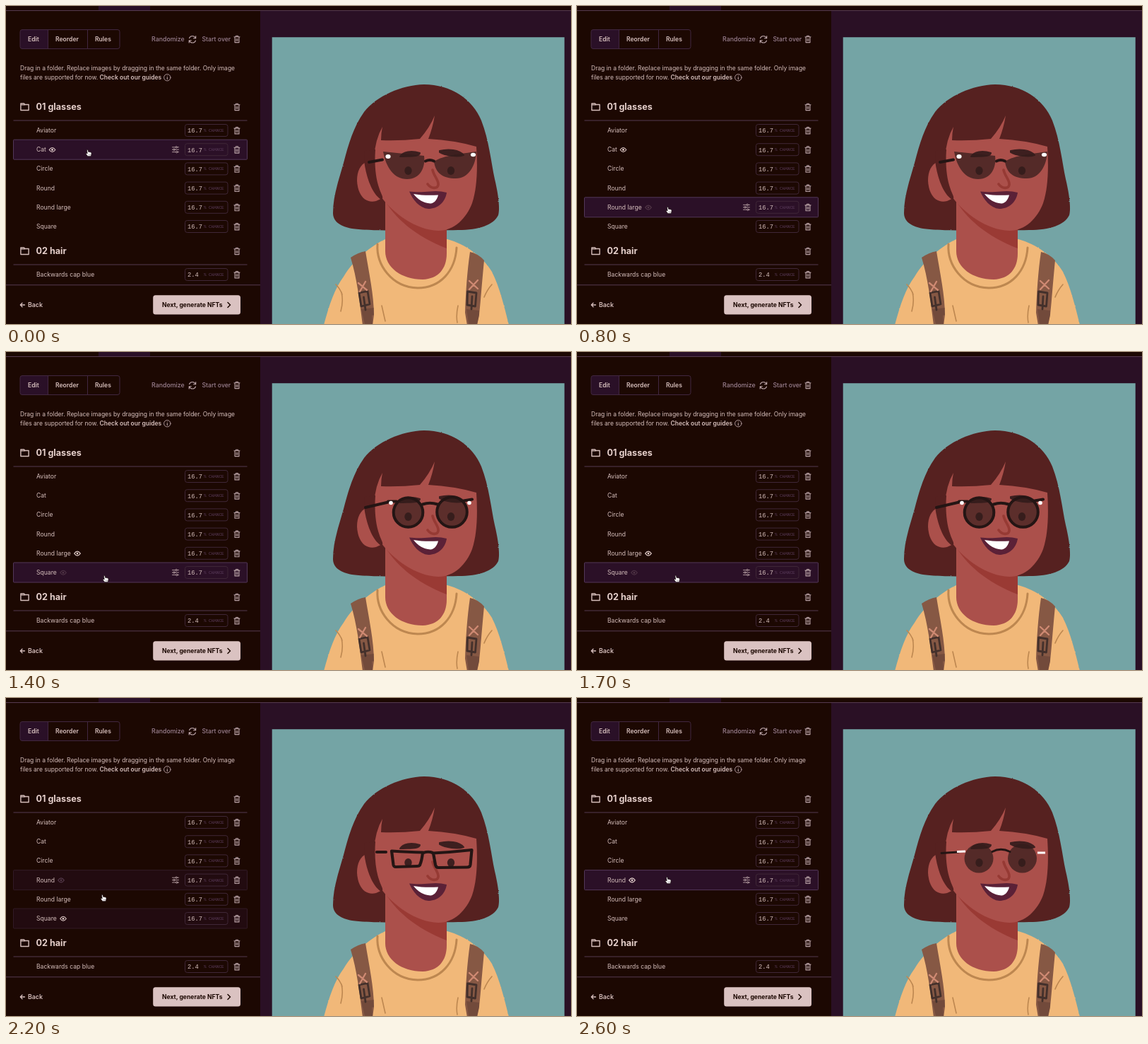
An HTML page that plays this animation: 800 by 450 pixels, repeating every 2.7 s.

```html
<!DOCTYPE html>
<html lang="en">
<head>
<meta charset="utf-8">
<title>Layer editor</title>
<style>
html, body { margin: 0; width: 100%; height: 100%; overflow: hidden; background: #1c0802; }
svg { display: block; width: 100vw; height: 100vh; }
text { font: 400 8.6px Inter, "Open Sans", sans-serif; fill: #d5bebc; white-space: pre; }
.b { font-weight: 600; }
.h { font-size: 12.6px; font-weight: 700; fill: #e6d0cc; }
.num { font: 8.8px "Liberation Mono", monospace; }
.unit { font: 6px "Liberation Mono", monospace; fill: #5b3c5c; }
.i { fill: none; stroke: #bba4a8; stroke-width: 1.1; stroke-linecap: round; stroke-linejoin: round; }
.ln { stroke: #553a50; stroke-width: 1; }
</style>
</head>
<body>
<svg viewBox="0 0 800 450" preserveAspectRatio="none">
  <defs>
    <filter id="rough" x="-5%" y="-5%" width="110%" height="110%" color-interpolation-filters="sRGB">
      <feTurbulence type="fractalNoise" baseFrequency=".25" numOctaves="2" seed="4"/>
      <feDisplacementMap in="SourceGraphic" scale="1.8" xChannelSelector="R" yChannelSelector="G"/>
    </filter>
    <g id="trash" class="i"><path d="M-4-3.200H4M-1.500-3.400V-4.800H1.500V-3.400M-3-3V4.600H3V-3M-1-.8V2.500M1-.8V2.500"/></g>
    <g id="folder" class="i" style="stroke:#d5bebc;stroke-width:1.4"><path d="M-5.6-4.5H-1L.4-3H5.6V5H-5.6Z M-5.6-2.6H0"/></g>
    <g id="eye"><path d="M-4.3 0Q0-6 4.3 0Q0 6-4.3 0Z" fill="none" stroke="currentColor" stroke-width="1.1"/><circle r="1.4" fill="currentColor"/></g>
    <g id="sliders" class="i" style="stroke-width:.9"><path d="M-4.500-3.400H-.1M2.500-3.400H4.500M-4.500 0H-3.300M-.7 0H4.500M-4.500 3.400H.5M3.100 3.400H4.500"/><circle cx="1.200" cy="-3.400" r="1.200"/><circle cx="-2" r="1.200"/><circle cx="1.800" cy="3.400" r="1.200"/></g>
  </defs>

  <rect width="800" height="450" fill="#1c0802"/>
  <rect x="360" y="7" width="440" height="443" fill="#2a1025"/>
  <rect x="131" width="73" height="6" fill="#2a1027"/>
  <path class="ln" d="M0 6.5H800"/>

  <!-- portrait -->
  <rect x="376.700" y="44.200" width="414" height="406" fill="#74a4a5"/>
  <g filter="url(#rough)">
    <path fill="#562120" d="M592 111C560 112 525 127 507 150C492 171 485 195 478 222C470 250 463 270 463 293C463 306 475 312 490 315C520 319 600 318 640 317C670 317 690 310 697 296C700 284 696 262 692 245C687 222 684 190 673 162C661 132 630 111 592 111Z"/>
    <path fill="#f1b879" d="M449 455C457 425 465 400 478 383C490 362 515 340 537 330H625C650 337 675 354 688 376C700 400 706 428 713 455Z"/>
  </g>
  <path fill="#ab504b" d="M537 275V347C537 370 560 387 590 387C612 386 624 372 624 350V290Z"/>
  <path fill="#9a3a34" d="M536 274C550 300 580 326 624 343V314L640 307C600 310 560 295 536 274Z"/>
  <g fill="none" stroke="#bd8750" stroke-linecap="round" stroke-width="3">
    <path d="M526 337C524 366 546 398 583 399C615 399 636 375 638 342"/>
    <path stroke-width="1.6" d="M467 394Q473 400 476 408M475 405Q478 418 474 432M532 424L537 446M688 394Q681 402 677 412M640 424Q637 438 639 448"/>
  </g>
  <path fill="#865844" d="M488 356Q498 349 509 347C514 378 521 410 521 437L519 452H505C501 420 497 385 488 356Z"/>
  <path fill="#865844" d="M657 348Q668 350 677 360C674 390 672 420 670 437L667 452H653L650 434C651 405 653 375 657 348Z"/>
  <path fill="#4d332c" d="M503 429L521 427V437L518 438L519 450H508ZM652 429L670 431V438L667 450H655Z" opacity=".35"/>
  <g fill="none" stroke="#43302b" stroke-width="2.800" stroke-linejoin="round" stroke-linecap="round">
    <path d="M500 406L512 403.500L515 422L503 425ZM506.500 412L509 430M653.500 404L666 406L664.500 425L653 423ZM660 411L659 429"/>
  </g>
  <path fill="none" stroke="#cf8a73" stroke-width="2.300" stroke-linecap="round" d="M499 392L511 402M509 390L501 404M656 389L668 400M668 388L656 401"/>
  <path fill="#ab504b" d="M530 224C511 213 497 225 497 247C498 268 509 280 524 276L537 270Z"/>
  <path fill="#ab504b" d="M521 215Q523 188 533 171Q531 180 531 190Q558 191 586 188Q600 172 607 155Q604 173 598 188Q635 190 666 199C668 230 667 258 660 279C652 300 635 318 612 318C580 317 548 293 531 270Z"/>
  <path fill="#562120" d="M507 219C510 243 518 265 531 274Q535 273 532 267C525 252 521 232 523 203L508 205Z"/>
  <path fill="none" stroke="#963a34" stroke-width="3.6" stroke-linecap="round" d="M604 232C606 241 613 247 612 253C611 259 602 259 597 252"/>
  <path fill="#5b2137" d="M571 262.500C583 264 592 263 600 262.500Q613 261 624 264C622 278 611 287 598 287C585 286 576 274 571 262.500Z"/>
  <path fill="#fff" d="M577 266C588 268 600 268 612 267.500C610 275 606 279 601 279.500C591 279 583 273.500 577 266Z"/>
  <g fill="#3d1f1f" stroke="#3d1f1f" stroke-width="2" stroke-linejoin="round">
    <path d="M558 213C562 206 574 204 586 208C585 214 570 212 558 213Z"/>
    <path d="M614 205C626 202 642 203 648 211C640 214 622 212 614 207Z"/>
    <g stroke="none"><ellipse cx="569.5" cy="233" rx="5.2" ry="6"/><ellipse cx="630" cy="233" rx="5.2" ry="6"/></g>
  </g>
  <g id="specs" fill="none" stroke="#241514" stroke-linecap="round" stroke-linejoin="round">
    <g data-row="1" stroke-width="4">
      <path fill="#341d1b" fill-opacity=".72" stroke="none" d="M534 206Q564 209 592 212C594 228 587 245 568 245C549 245 538 228 534 206ZM606 220C620 211 645 209 666 206C665 226 655 244 637 244C618 244 608 236 606 220Z"/>
      <path d="M514 221L533 217.500M594 219.500Q600 216.500 606 219.500"/>
      <g fill="#fff" stroke="none"><ellipse cx="541" cy="213" rx="3.6" ry="3"/><ellipse cx="661.500" cy="210.500" rx="3.600" ry="2.800"/></g>
    </g>
    <g data-row="4" stroke-width="4">
      <g fill="#341d1b" fill-opacity=".65"><circle cx="569.500" cy="227" r="20.800"/><circle cx="631.500" cy="226.500" r="21.300"/></g>
      <path d="M509 220L541 212.500M541 211.500H553M590 215.500Q600 212 611 215.500M648 210.500L660 208.500"/>
      <g fill="#fff" stroke="none"><circle cx="545" cy="213.500" r="2.800"/><circle cx="656" cy="213.500" r="2.800"/></g>
    </g>
    <g data-row="5" stroke-width="4.200">
      <path d="M525 218H538M546 216.500Q570 218 590 218.500Q589 229 586 236.500Q585 238 582 238L552 239Q549 239 548.500 236ZM605 219.500Q632 218 659.500 215L657.500 236Q657 239.500 653 239.500L612 240Q609 240 608 236ZM591 219Q598 216.500 604 219"/>
    </g>
    <g data-row="3" stroke-width="3">
      <g fill="#341d1b" fill-opacity=".72" stroke="none"><circle cx="569" cy="227" r="20.500"/><circle cx="630.500" cy="227" r="20.500"/></g>
      <path d="M516 219.500L540 218M588 217.500Q600 211 613 217.500"/>
      <path stroke="#fff" stroke-linecap="butt" d="M538 217.500L550 217M652 219H663"/>
    </g>
  </g>

  <!-- toolbar -->
  <path fill="#2a1027" d="M23 33.500H59.500V60.500H23Q20 60.500 20 57.500V36.500Q20 33.500 23 33.500Z"/>
  <rect x="20" y="33.500" width="141" height="27" rx="3" fill="none" stroke="#412740"/>
  <path stroke="#412740" d="M59.500 33.500V60.500M115.500 33.500V60.500"/>
  <text class="b" x="31" y="50.200">Edit</text>
  <text class="b" x="70" y="50.200">Reorder</text>
  <text class="b" x="126" y="50.200">Rules</text>
  <text x="206" y="50.200" style="fill:#9b8090;font-weight:500;font-size:8.800px">Randomize</text>
  <path class="i" d="M259.500 45.500A4.700 4.700 0 0 1 268.300 45.500M268.500 49A4.700 4.700 0 0 1 259.700 49M268.700 42.500V45.700H265.500M259.200 52V48.800H262.400"/>
  <text x="277.500" y="50.200" style="fill:#9b8090;font-weight:500;font-size:8.700px">Start over</text>
  <use href="#trash" x="327" y="47"/>
  <text x="20" y="91" style="font-size:8.500px">Drag in a folder. Replace images by dragging in the same folder. Only image</text>
  <text x="20" y="104.200" style="font-size:8.500px">files are supported for now. <tspan class="b">Check out our guides</tspan></text>
  <circle class="i" cx="228.300" cy="101.200" r="4.700" style="stroke-width:.9"/>
  <path class="i" d="M228.300 100.700V103.600M228.300 98.700V98.800"/>

  <g id="list"></g>

  <!-- footer -->
  <path class="ln" d="M0 394.800H360"/>
  <path class="i" style="stroke:#d5bebc;stroke-width:1.300" d="M26.500 423H20.500M23 420.300L20.300 423L23 425.700"/>
  <text class="b" x="31" y="426.200" style="font-size:8.800px">Back</text>
  <rect x="208.200" y="409.200" width="123.800" height="27.200" rx="3.500" fill="#dac2c1"/>
  <text x="221" y="426.200" style="font-weight:700;fill:#1c0802">Next, generate NFTs</text>
  <path class="i" style="stroke:#1c0802;stroke-width:1.500" d="M314 419.500L317.500 423L314 426.500"/>

  <g id="hand">
    <path d="M-2.600-4.300Q-1.900-5.300-1-4.300L-.2-1.400Q.5-2 1.300-1.300Q2.300-1.800 2.800-.9Q4-1 4.100.3L3.800 3L3 4.700H-1.200L-3.700 1.500Q-4 .2-2.800.2L-1.800 1Z" fill="#fff" stroke="#150608" stroke-width=".7"/>
    <path d="M0 1.500V3.500M1.400 1.500V3.500M2.700 1.500V3.500" stroke="#6b5560" stroke-width=".5"/>
  </g>
</svg>
<script>
const LOOP = 2700, STEP = 100, FADE = 150;
const names = ["Aviator", "Cat", "Circle", "Round", "Round large", "Square"];
const eyeX = [83, 65.5, 76, 78, 101, 81];
const rowY = i => 176 + i * 27.2;

// [time, row]
const hovers = [[-500, 1], [220, 2], [370, 3], [440, 4], [1240, 5], [2110, 4], [2140, 3], [LOOP, -1]];
const picks = [[0, 1], [1000, 4], [1800, 5], [2500, 3]];
// [time, x, y]
const path = [[0, 117, 208], [100, 117, 208], [200, 125, 223], [300, 136, 243], [400, 142.5, 266],
  [500, 136, 284], [600, 130, 289], [1200, 130, 289], [1300, 136, 311], [1400, 141, 321],
  [2100, 142, 321], [2200, 138, 283], [2300, 131.5, 257], [2500, 129, 258], [LOOP, 129, 258]];

const chance = (y, n) => `<rect x="253.500" y="${y - 8.5}" width="60.500" height="17" rx="3" fill="none" stroke="#3f2737"/>
  <text class="num" x="257" y="${y + 3.3}">${n}</text><text class="unit" x="280" y="${y + 2}">%</text>
  <text class="unit" x="287" y="${y + 2}">CHANCE</text><use href="#trash" x="327" y="${y + .3}"/>`;
const heading = (y, s) => `<use href="#folder" x="26.500" y="${y}"/><text class="h" x="42.500" y="${y + 4.4}">${s}</text>
  <use href="#trash" x="327" y="${y + .5}"/><path class="ln" d="M10.500 ${y + 19.5}H341.500"/>`;
const row = (s, i) => {
  const y = rowY(i);
  return `<rect class="glow" x="10.500" y="${y - 14}" width="331" height="28" rx="1" fill="#2b1027" stroke="#523759"/>
    <text x="43" y="${y + 3}">${s}</text><use class="see" href="#eye" x="${eyeX[i]}" y="${y + .3}"/>
    <use class="tune" href="#sliders" x="240" y="${y}"/>${chance(y, "16.7")}`;
};

const list = document.getElementById("list");
list.innerHTML = heading(142.5, "01 glasses") + names.map(row).join("") + heading(346.5, "02 hair") +
  `<text x="43" y="383">Backwards cap blue</text>` + chance(380, "2.4");
const all = c => [...list.querySelectorAll(c)];
const glows = all(".glow"), eyes = all(".see"), tunes = all(".tune");
const specs = [...document.querySelectorAll("#specs > g")];
const hand = document.getElementById("hand");

const clamp = v => Math.max(0, Math.min(1, v));
const latest = (keys, t) => keys.filter(k => k[0] <= t).pop()[1];
const show = (el, on) => el.setAttribute("visibility", on ? "visible" : "hidden");

function glow(i, t) {
  let a = 0;
  for (let k = 0; k < hovers.length - 1; k++) {
    const [start, r] = hovers[k], end = hovers[k + 1][0];
    if (r !== i || t < start) continue;
    const peak = clamp((Math.min(t, end) - start) / FADE);
    a = Math.max(a, peak - Math.max(0, t - end) / FADE);
  }
  return clamp(a);
}

function draw(t) {
  const hover = latest(hovers, t), pick = latest(picks, t);
  names.forEach((_, i) => {
    glows[i].setAttribute("opacity", glow(i, t));
    show(eyes[i], i === hover || i === pick);
    eyes[i].style.color = i === pick ? "#e3cecb" : "#513647";
    show(tunes[i], i === hover);
  });
  specs.forEach(g => show(g, +g.dataset.row === pick));
  const k = path.findIndex(p => p[0] > t), [t0, x0, y0] = path[k - 1], [t1, x1, y1] = path[k];
  const u = (t - t0) / (t1 - t0);
  hand.setAttribute("transform", `translate(${x0 + (x1 - x0) * u} ${y0 + (y1 - y0) * u})`);
}

const start = performance.now();
function tick() {
  const t = (performance.now() - start) % LOOP;
  draw(Math.floor(t / STEP) * STEP);
  requestAnimationFrame(tick);
}
draw(0);
requestAnimationFrame(tick);
</script>
</body>
</html>
```
